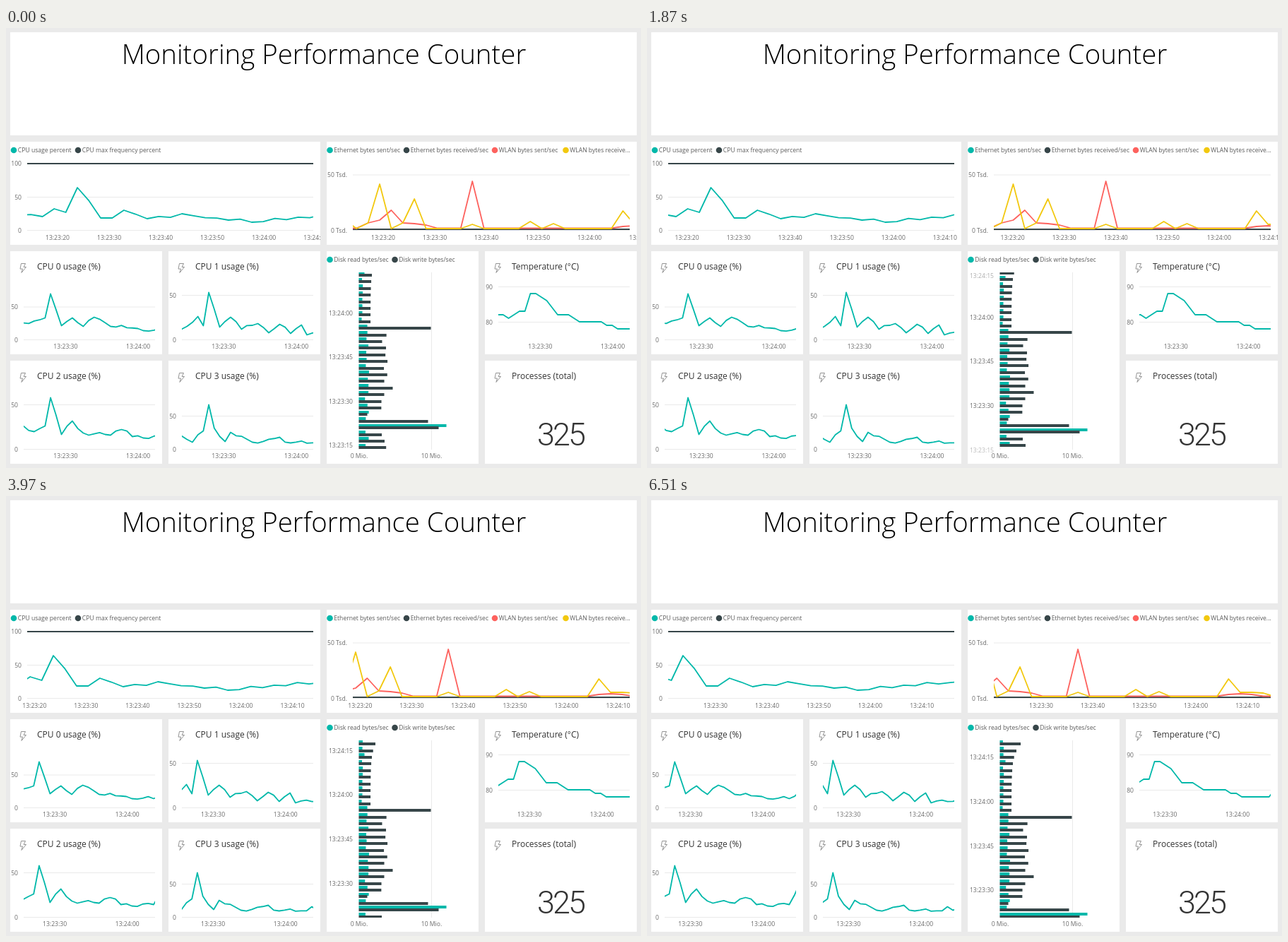
Write an HTML page with a canvas that moves like this. It is 899 px wide and 623 px high and loops after 8000 ms.

```html
<!DOCTYPE html>
<html lang="en">
<head>
<meta charset="utf-8">
<title>Monitoring Performance Counter</title>
<style>
  html, body { margin: 0; width: 100%; height: 100%; overflow: hidden; background: #eaeaea; }
  canvas { display: block; }
</style>
</head>
<body>
<canvas id="stage" width="899" height="623"></canvas>
<script>
const ctx = document.getElementById('stage').getContext('2d');
const SANS = '"Open Sans", "Noto Sans", sans-serif';
const TEAL = '#01b8aa', DARK = '#374649', RED = '#fd625e', YELLOW = '#f2c80f';
const GRID = '#eaeaea', GREY = '#6a6a6a', LEGEND = '#5c5c5c';
const LOOP = 8000, TICK = 30, SAMPLES = 30;
const SHIFTS = [[1780, 1990], [3780, 3970], [6300, 6510]];

// Tiles: x, y, width, height
const TILES = {
  title: [6, 6, 887, 146],
  cpu: [6, 161, 439, 146], net: [454, 161, 439, 146],
  cpu0: [6, 316, 215, 146], cpu1: [230, 316, 215, 146],
  cpu2: [6, 471, 215, 146], cpu3: [230, 471, 215, 146],
  disk: [454, 316, 215, 301],
  temp: [678, 316, 215, 146], proc: [678, 471, 215, 146]
};

// Repeatable noise from -1 to 1
function noise(i, seed) {
  const v = Math.sin(i * 12.9898 + seed * 78.233) * 43758.5453;
  return 2 * (v - Math.floor(v)) - 1;
}

const samples = rule => Array.from({ length: SAMPLES }, (_, i) => rule(i));

// Joins [sample, height] keys by straight lines, with noise between the keys
function trace(keys, jitter = 0, seed = 0) {
  return samples(i => {
    const b = keys.findIndex(([k]) => k >= i);
    if (b < 0) return keys[keys.length - 1][1];
    const [k2, h2] = keys[b];
    if (k2 === i) return h2;
    const [k1, h1] = keys[b - 1];
    return h1 + (h2 - h1) * (i - k1) / (k2 - k1) + jitter * noise(i, seed);
  });
}

const spikes = (base, peaks) => samples(i => peaks[i] ?? base);

// Line series are heights in pixels above the axis, oldest sample first
const cpuLoad = trace([[0, 22], [2, 20], [3, 31], [4, 26], [5, 61], [7, 18], [8, 18], [9, 29],
  [11, 17], [14, 24], [20, 12], [29, 24]], 3, 4);
const wlanIn = spikes(3, { 0: 15, 2: 11, 3: 66, 5: 11, 6: 45, 11: 9, 16: 13, 18: 10, 24: 28, 25: 9, 26: 9, 27: 8 });
const wlanOut = spikes(3.5, { 2: 11, 3: 15, 4: 29, 5: 11, 6: 10, 7: 8, 11: 70, 24: 6, 25: 7, 26: 6 });
const core0 = trace([[0, 24], [4, 31], [5, 65], [7, 20], [9, 31], [11, 19], [13, 32],
  [16, 19], [26, 13], [28, 24]], 3, 2);
const core1 = trace([[0, 15], [3, 33], [4, 20], [5, 67], [7, 18], [9, 32], [11, 15],
  [14, 23], [16, 10], [18, 22], [20, 9], [22, 21], [23, 7], [28, 12]], 3, 5);
const core2 = trace([[0, 33], [2, 25], [4, 33], [5, 73], [7, 21], [9, 40], [11, 23], [16, 20],
  [18, 28], [20, 18], [26, 18], [28, 50]], 3, 7);
const core3 = trace([[0, 19], [2, 10], [4, 26], [5, 63], [6, 30], [8, 11], [9, 24], [13, 10],
  [18, 17], [20, 9], [28, 13]], 3, 3);
const degrees = trace([[0, 82], [2, 81], [4, 83], [5, 83], [6, 88], [7, 88], [9, 86], [11, 82],
  [13, 82], [15, 80], [19, 80], [22, 78], [27, 78], [28, 80]]).map(d => (Math.round(d) - 70) * 5);

// Bar lengths, newest first: a quiet stretch after a busy one, with single bursts
const readBursts = { 3: 8, 26: 124 };
const writeBursts = { 11: 102, 20: 48, 24: 12, 25: 98, 26: 113 };
const diskRead = samples(i => readBursts[i] ?? (i < 11 ? 5 + noise(i, 1) : 11.5 + 3 * noise(i, 1)));
const diskWrite = samples(i => writeBursts[i] ??
  (i < 11 ? 16.5 + 13 * Math.exp(-i / 1.6) : 36 + 5 * noise(i, 2)));

function text(str, x, cy, size, { align = 'left', color = GREY, weight = 400, font = SANS } = {}) {
  ctx.font = `${weight} ${size}px ${font}`;
  ctx.textAlign = align;
  ctx.fillStyle = color;
  ctx.fillText(str, x, cy + size * 0.36);
}

const small = (str, x, cy, align, color) => text(str, x, cy, 8.6, { align, color });

function rule(x1, y1, x2, y2, color = GRID, width = 1) {
  ctx.strokeStyle = color;
  ctx.lineWidth = width;
  ctx.beginPath();
  ctx.moveTo(x1, y1);
  ctx.lineTo(x2, y2);
  ctx.stroke();
}

function clipped([x, y, w, h], draw) {
  ctx.save();
  ctx.beginPath();
  ctx.rect(x, y, w, h);
  ctx.clip();
  draw();
  ctx.restore();
}

// Seconds after 13:23:00
function clock(s) {
  const pad = n => String(n).padStart(2, '0');
  return `13:${pad(23 + Math.floor(s / 60))}:${pad(s % 60)}`;
}

function legend(y, items) {
  for (const [x, color, label] of items) {
    ctx.fillStyle = color;
    ctx.beginPath();
    ctx.arc(x, y, 4.3, 0, Math.PI * 2);
    ctx.fill();
    small(label, x + 5.8, y, 'left', LEGEND);
  }
}

function series(data, x, gap, base, color) {
  ctx.strokeStyle = color;
  ctx.lineWidth = 1.8;
  ctx.lineJoin = 'round';
  ctx.beginPath();
  data.forEach((h, i) => ctx.lineTo(x + i * gap, base - h));
  ctx.stroke();
}

function timeAxis(tile, left, x, y, first, every, gap) {
  clipped(tile, () => {
    for (let i = 0; i < 7; i++) {
      const cx = x + i * gap;
      if (cx >= left) small(clock(first + i * every), cx, y, 'center');
    }
  });
}

function bolt(x, y) {
  const pts = [[2, 0], [8, 0], [5.6, 5], [9, 5], [2.4, 13], [4, 7.6], [0.5, 7.6]];
  ctx.strokeStyle = '#888';
  ctx.lineWidth = 0.9;
  ctx.beginPath();
  pts.forEach(([dx, dy]) => ctx.lineTo(x + dx, y + dy));
  ctx.closePath();
  ctx.stroke();
}

function heading([x, y], label) {
  bolt(x + 13.5, y + 17.5);
  text(label, x + 38, y + 21.5, 12, { color: '#333' });
}

function cpuChart({ scroll, step }) {
  legend(173, [[11, TEAL, 'CPU usage percent'], [102, DARK, 'CPU max frequency percent']]);
  [[100, 192], [50, 239.5], [0, 286.5]].forEach(([v, y]) => {
    rule(30, y, 435, y);
    small(v, 22, y, 'right');
  });
  clipped([30, 185, 405, 103], () => {
    series(cpuLoad, 17 - 16.1 * scroll, 16.45, 287, TEAL);
    rule(30, 192, 435, 192, DARK, 1.8);
  });
  timeAxis(TILES.cpu, 30, 73 - 16.35 * step, 296.5, 20, 10, 73.05);
}

function netChart({ scroll, step }) {
  legend(173, [[458.5, TEAL, 'Ethernet bytes sent/sec'], [567, DARK, 'Ethernet bytes received/sec'],
    [692, RED, 'WLAN bytes sent/sec'], [792.5, YELLOW, 'WLAN bytes receive...']]);
  [['50 Tsd.', 208], ['0 Tsd.', 286.5]].forEach(([v, y]) => {
    rule(491, y, 883, y);
    small(v, 483, y, 'right');
  });
  clipped([491, 200, 392, 88], () => {
    const x = 478 - 16.1 * scroll;
    rule(491, 285, 883, 285, DARK, 1.8);
    series(wlanOut, x, 16.4, 287, RED);
    series(wlanIn, x, 16.4, 287, YELLOW);
  });
  timeAxis(TILES.net, 491, 534 - 16.35 * step, 296.5, 20, 10, 73.05);
}

function smallChart({ scroll, step }, tile, label, data, start, base, ticks) {
  const [x, y] = tile;
  const left = x + 19;
  heading(tile, label);
  for (const [v, cy] of ticks) {
    rule(left, cy, left + 186, cy);
    small(v, x + 11, cy, 'right');
  }
  clipped([left, y + 40, 186, 90], () =>
    series(data, x + start - 7.65 * scroll, 7.72, base, TEAL));
  timeAxis(tile, left, x + 78.4 - 7.67 * step, y + 135, 30, 30, 102.7);
}

function diskChart({ scroll, step, progress }) {
  const top = 346, bottom = 597, pitch = 9.4;
  const lag = pitch * (step - scroll);
  legend(328, [[458.5, TEAL, 'Disk read bytes/sec'], [550.5, DARK, 'Disk write bytes/sec']]);
  [[500, '0 Mio.'], [602.5, '10 Mio.']].forEach(([x, label]) => {
    rule(x, top, x, bottom);
    small(label, x, 606, 'center');
  });
  clipped([499, top, 168, bottom - top], () => {
    for (let row = 0; row < 27; row++) {
      const i = 3 - step + row, y = 351 + row * pitch - lag;
      ctx.fillStyle = TEAL;
      ctx.fillRect(499.5, Math.round(y - 5.6), diskRead[i], 4);
      ctx.fillStyle = DARK;
      ctx.fillRect(499.5, Math.round(y - 1.9), diskWrite[i], 4);
    }
  });
  for (let s = 15; s <= 75; s += 15) {
    const rest = 404.6 + pitch * step - (s - 60) * 4.175;
    const before = rest - pitch;
    if (rest < top || before > bottom) continue;
    const entering = before < top, leaving = rest > bottom;
    ctx.globalAlpha = entering ? progress : leaving ? 1 - progress : 1;
    small(clock(s), 491, entering ? rest : rest - lag, 'right');
    ctx.globalAlpha = 1;
  }
}

// step: axis position, scroll: position of the plotted data
function stateAt(t) {
  if (t < TICK) return { step: 0, scroll: -0.114, progress: 0.886 };
  let step = 0, progress = 1;
  SHIFTS.forEach(([from, to], i) => {
    if (t < from) return;
    step = i + 1;
    const passed = Math.floor((t - from) / TICK) * TICK;
    progress = t >= to ? 1 : 0.2 + 0.8 * passed / (to - from);
  });
  return { step, scroll: step - 1 + progress, progress };
}

function draw(t) {
  const s = stateAt(t);
  ctx.fillStyle = '#eaeaea';
  ctx.fillRect(0, 0, 899, 623);
  ctx.fillStyle = '#fff';
  Object.values(TILES).forEach(r => ctx.fillRect(...r));

  text('Monitoring Performance Counter', 450, 37, 38.4, { align: 'center', color: '#000', weight: 300 });
  cpuChart(s);
  netChart(s);
  smallChart(s, TILES.cpu0, 'CPU 0 usage (%)', core0, 17.6, 441.5, [[50, 395], [0, 441.5]]);
  smallChart(s, TILES.cpu1, 'CPU 1 usage (%)', core1, 17.6, 441.5, [[50, 378.5], [0, 441.5]]);
  smallChart(s, TILES.cpu2, 'CPU 2 usage (%)', core2, 17.6, 596.5, [[50, 533.5], [0, 596.5]]);
  smallChart(s, TILES.cpu3, 'CPU 3 usage (%)', core3, 17.6, 596.5, [[50, 549.5], [0, 596.5]]);
  smallChart(s, TILES.temp, 'Temperature (°C)', degrees, 17.2, 466, [[90, 366.5], [80, 416.5]]);
  diskChart(s);
  heading(TILES.proc, 'Processes (total)');
  ctx.letterSpacing = '-3px';
  text('325', 785, 575, 45, { align: 'center', color: '#333', weight: 300, font: 'Roboto, sans-serif' });
  ctx.letterSpacing = '0px';
}

function loop() {
  draw(performance.now() % LOOP);
  requestAnimationFrame(loop);
}
loop();
</script>
</body>
</html>
```
